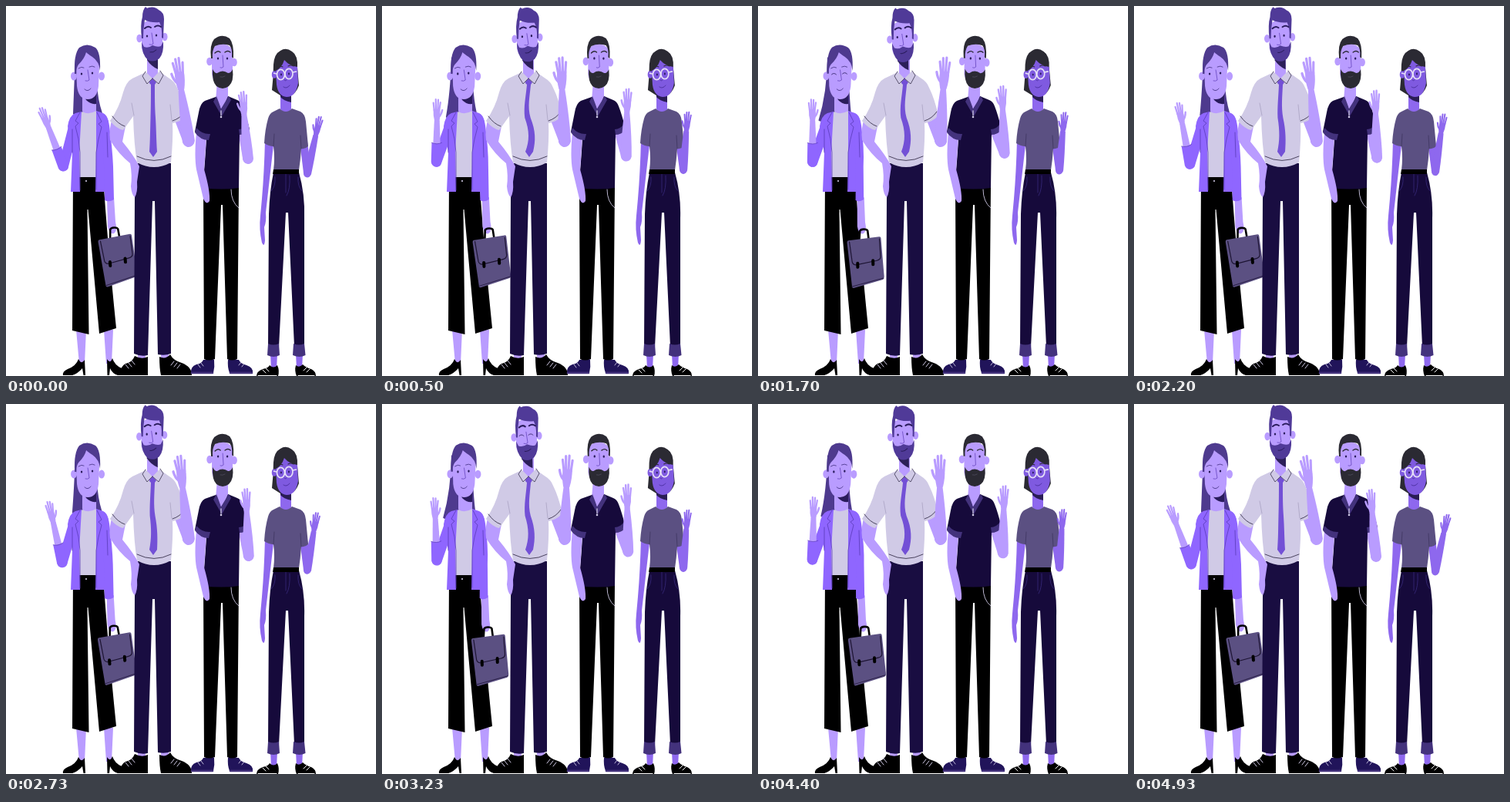
Recreate the animation shown at these times as an HTML page. Size 480 by 480 pixels, loop 5.01 s.

```html
<!DOCTYPE html>
<html lang="en">
<head>
<meta charset="utf-8">
<title>Four people waving</title>
<style>
  html, body { margin: 0; width: 100%; height: 100%; overflow: hidden; background: #fff; }
  svg { display: block; width: 100vw; height: 100vh; }
</style>
</head>
<body>
<svg id="stage" viewBox="0 0 480 480"></svg>
<script>
const C = {
  skin: '#b99cff', deep: '#8e68ee', face4: '#7f5ae0', plum: '#4e3a8e', violet: '#8f66ff',
  cloth: '#d0cae6', navy: '#190d41', indigo: '#160a3b', band: '#43327c', slate: '#5b5082',
  coal: '#2b2a33', black: '#000', ink: '#2a1c5c', tie: '#7350d6', white: '#fff'
};

// markup helpers
const fill = (color, d, id = '') => `<path id="${id}" fill="${color}" d="${d}"/>`;
const line = (color, d, w = 1) =>
  `<path fill="none" stroke="${color}" stroke-width="${w}" stroke-linecap="round" stroke-linejoin="round" d="${d}"/>`;
const oval = (color, x, y, rx, ry = rx) =>
  `<ellipse fill="${color}" cx="${x}" cy="${y}" rx="${rx}" ry="${ry}"/>`;
const group = (id, ...parts) => `<g id="${id}">${parts.join('')}</g>`;
const upperArm = (i, color, x, y, w) =>
  `<line id="upper${i}" x1="${x}" y1="${y}" stroke="${color}" stroke-width="${w}" stroke-linecap="round"/>`;

const hand = (color, y, k, side) => `<g transform="translate(0 ${-y}) scale(${k * side} ${k})">` +
  fill(color, 'M-3 2 Q-5.4 -7 -5 -15 H3.8 Q5 -8 3 2Z') +
  line(color, 'M-3.8 -13 L-5 -23.5 M-1.5 -14 L-1.9 -28 M.9 -14 L1.4 -27.5 M2.8 -13 L4.4 -24', 2.3) +
  line(color, 'M3 -5 Q6 -8 7 -14', 2.4) + '</g>';

const forearm = (i, color, w, len, k, side, extra = '') => group('arm' + i,
  fill(color, `M${-w} 0 Q${-w} -${len * .4} -3.4 -${len} H3.4 Q${w} -${len * .4} ${w} 0 Q${w * .8} 6 0 6 Q${-w * .8} 6 ${-w} 0Z`),
  hand(color, len, k, side), extra);

const eyes = (i, pts) =>
  group(`eyes${i}Open`, ...pts.map(([x, y]) => oval(C.ink, x, y, 1.2, 1.6))) +
  group(`eyes${i}Shut`, ...pts.map(([x, y]) => line(C.ink, `M${x - 3} ${y + 1} q3 -3 6 0`, .8)));

const woman1 = () =>
  fill(C.plum, '', 'hair1') +
  fill(C.skin, 'M91 420 H104 L102 464 H95Z M127 420 H139 L137 464 H130Z') +
  fill(C.black, 'M94 458 Q98 466 102 459 L103 479 H100.5 L99 470 Q93 477 86 479 H74 Q73 474 80 471 Q91 467 94 458Z') +
  fill(C.black, 'M131 458 Q135 465 138 457 Q141 466 150 470 Q156 474 156 479 H145 Q138 477 135 470 L134 479 H131.5Z') +
  fill(C.black, 'M87 220 H126 Q131 300 143 418 L121 425 L106.5 264 H105.5 L107.5 426 L86 421Z') +
  oval(C.cloth, 104, 227, 1.1) +
  group('bagArm',
    fill(C.skin, 'M131 248 H140 L142 280 Q145 292 140 295 Q134 297 132 286Z')) +
  group('bag',
    line(C.black, 'M-6 13 L-5 2 Q-4 0 0 0 Q4 0 5 2 L6 12', 2.6),
    fill(C.slate, 'M-20 14 L20 10 Q22 10 22 12 L25 62 Q25 65 23 66 L-15 76 Q-17 76 -17 74 L-22 17 Q-22 14 -20 14Z'),
    line('#1d1433', 'M-19 16 L-16 42 Q-15 46 -11 46 L16 41 Q21 40 21 36 L20 13', 1.2),
    line(C.black, 'M-9 44 v5 M11 41 v5', 4),
    line('#2b2148', 'M-17 74 L24 64', 1)) +
  fill(C.skin, 'M99 108 H117 V136 Q112 142 106 142 Q101 142 99 136Z') +
  fill(C.cloth, 'M95 141 L99 137 Q107 142 117 136 L119 141 V222 H95Z') +
  upperArm(1, C.violet, 88, 155, 13) +
  fill(C.violet, 'M98 137 L90 139 Q82 142 80 156 L86 190 L84 241 H96 L95 190Z') +
  fill(C.violet, 'M117 136 L126 139 Q131 141 133 150 L128 241 H116 L117 190Z') +
  fill(C.violet, '', 'sleeve1') +
  line('#5a3bb8', 'M96 138 L90 149 L94 152 L90 156 Q95 172 96 190 L96 239 M118 138 L124 150 L120 153 L124 157 Q119 174 117 190 V238 M86 160 L86 190 M131 164 L132 196', .8) +
  group('head1',
    oval(C.skin, 88, 91, 4, 5.5) + oval(C.skin, 124, 91, 4, 5.5),
    fill(C.ink, 'M99 114 H117 L117 127 Q110 128 104 122Z'),
    fill(C.skin, 'M91 78 Q92 58 105 58 Q120 58 121 78 L120 104 Q118 121 106 121 Q94 121 92 104Z'),
    fill(C.plum, 'M89 88 Q88 62 95 54 Q105 47 116 54 Q123 60 122 84 Q121 72 112 66 Q106 62 104 60 Q102 68 94 76 Q91 80 91 88Z'),
    eyes(1, [[98, 88], [112, 87]]),
    line(C.plum, 'M94 81 q4 -3 7 -1 M108 79 q4 -2 7 0', .9),
    line('#6f4fc4', 'M106 83 L108 96 Q106 98 103 97', .9),
    line(C.plum, 'M102 108 Q106 112 110 107', .9)) +
  forearm(1, C.skin, 5, 54, .97, 1,
    fill(C.violet, 'M-7 0 L-6.5 -25 Q0 -22 6.5 -25 L6.5 0 Q6 6 0 6 Q-6 6 -7 0Z') +
    line('#5a3bb8', 'M-6.5 -25 Q0 -22 6.5 -25', .7));

const man2 = () =>
  fill(C.skin, 'M171 448 H181 V460 H171Z M201 448 H211 V460 H201Z') +
  fill(C.black, 'M167 454 Q176 459 184 455 V479 H149 Q147 468 155 464 Q164 462 167 454Z') +
  fill(C.black, 'M199 455 Q207 459 213 452 Q217 460 228 463 Q241 468 241 479 H201 Q199 470 199 455Z') +
  line(C.cloth, 'M155 465 l4 5 M159 463 l4 5 M163 460 l4 5 M218 461 l-4 5 M222 463 l-4 5 M226 465 l-4 5', 1) +
  fill(C.navy, 'M169 204 H214 V451 Q206 454 197 452 L193 253 H190 L184 453 Q175 455 166 451 L167 250Z') +
  fill(C.skin, 'M138 146 Q133 160 135 174 Q146 192 161 204 Q164 220 162 234 Q163 245 167 248 Q171 242 170 228 L173 208 Q166 194 151 176 L155 156Z') +
  upperArm(2, C.skin, 224, 142, 14) +
  fill(C.skin, 'M183 62 H197 V88 L190 97 L183 88Z') +
  fill(C.cloth, 'M181 86 L164 94 Q156 98 152 112 Q147 132 135 149 Q143 159 152 161 L165 143 Q166 180 170 203 Q192 215 214 203 Q217 172 216 152 Q227 150 234 142 Q229 120 222 106 Q219 98 212 94 L199 85 L190 95Z') +
  line('#3b3550', 'M138 143 Q145 153 154 156 M216 149 Q226 146 232 137 M170 195 Q192 206 214 195', .9) +
  line('#a49dbd', 'M166 142 L163 126 M215 148 L213 128', .7) +
  fill(C.tie, '', 'tie') +
  fill(C.tie, 'M186 93 H194 L195 99 L191 105 L186 100Z') +
  fill(C.cloth, 'M181 85 L190 94 L183 102 L177 91Z M200 84 L190 94 L198 102 L204 90Z') +
  line('#3b3550', 'M181 85 L177 91 L183 101 L190 94 L198 101 L204 90 L200 84', .8) +
  group('head2',
    oval(C.skin, 173, 42, 3.6, 5.2) + oval(C.skin, 206, 40, 3.6, 5.2),
    fill('#2c1f59', 'M183 64 H197 V82 Q188 78 183 70Z'),
    fill(C.skin, 'M176 24 Q189 12 203 22 L203 54 Q201 67 190 67 Q178 67 176 54Z'),
    fill('#503a98', 'M176 42 Q174 24 177 14 Q177 5 181 1 Q183 4 185 2 Q193 0 198 5 Q205 8 205 17 L204 42 L202 41 Q203 29 199 21 Q188 22 180 18 Q178 29 178 42Z'),
    fill('#503a98', 'M176 47 L179 53 Q185 55 190 51 Q197 54 201 52 L204 46 Q205 61 199 68 Q192 74 184 70 Q176 63 176 47Z'),
    line(C.ink, 'M187 60 Q191 61 195 57', 1),
    line(C.ink, 'M180 29 Q184 25 188 28 M193 27 Q197 24 201 27', 2),
    eyes(2, [[183, 39], [195, 38]]),
    line('#6f4fc4', 'M189 35 L191 49 Q189 51 186 50', .9)) +
  forearm(2, C.skin, 8, 71, 1.36, -1);

const man3 = () =>
  fill(C.skin, 'M259 452 H270 V464 H259Z M288 452 H299 V464 H288Z') +
  fill('#21145a', 'M256 459 H270 Q271 468 269 476 H240 Q239 468 247 465 Q254 464 256 459Z M288 459 H302 Q304 464 312 466 Q321 469 320 476 H290 Q287 468 288 459Z') +
  line(C.band, 'M241 476 H268 M291 476 H319', 2.6) +
  line(C.cloth, 'M249 465 l3 4 M253 463 l3 4 M309 464 l-3 4 M305 462 l-3 4', .9) +
  fill(C.black, 'M256 234 H302 L300 458 Q293 461 287 458 L281 258 H279 L271 458 Q263 461 257 458Z') +
  line(C.cloth, 'M292 238 Q292 254 302 262', .9) +
  upperArm(3, C.skin, 307, 160, 13) +
  fill(C.skin, 'M274 98 H288 V120 L280 136 L272 122Z') +
  fill(C.indigo, 'M272 118 L258 123 Q252 126 250 138 L245 163 Q252 172 260 172 Q258 206 255 236 Q280 239 302 236 L303 166 Q311 166 316 160 Q311 140 307 130 Q305 124 300 122 L288 117 L279 138Z') +
  fill(C.skin, 'M247 164 Q244 195 247 212 L256 250 Q260 259 264 253 Q265 240 257 212 L260 170Z') +
  fill(C.band, 'M247 158 Q255 167 265 166 L263 174 Q252 174 245 164Z M302 160 Q309 160 314 153 L316 161 Q310 167 303 167Z') +
  fill(C.band, 'M273 117 L279 133 L289 117 L292 122 L280 143 L269 124Z') +
  fill(C.skin, 'M274 114 H288 L279 133Z') +
  line(C.cloth, 'M279 136 V142', 1.3) + oval(C.cloth, 279, 144, 1.3) +
  group('head3',
    oval(C.skin, 264, 72, 3.8, 5.3) + oval(C.skin, 296, 73, 3.8, 5.3),
    fill(C.skin, 'M267 56 Q280 42 294 56 L294 88 Q291 104 281 104 Q270 104 267 88Z'),
    fill(C.coal, 'M266 68 Q264 50 270 43 Q280 35 290 42 Q296 49 295 68 L293 66 Q294 56 290 51 Q280 48 271 52 Q267 58 268 68Z'),
    fill(C.coal, 'M268 82 Q271 88 274 87 Q281 82 288 87 Q292 87 294 82 Q296 98 289 104 Q281 110 273 104 Q267 98 268 82Z'),
    line('#4a4758', 'M278 92 Q281 93 284 91', .9),
    line(C.coal, 'M271 61 Q275 57 278 60 M284 60 Q288 57 291 60', 1.4),
    eyes(3, [[275, 68], [287, 68]]),
    line('#6f4fc4', 'M281 64 L282 79 Q280 81 278 80', .9)) +
  forearm(3, C.skin, 7, 58, 1.05, -1);

const woman4 = () =>
  fill(C.deep, 'M343 450 H352 L351 472 H344Z M376 450 H385 L384 472 H377Z') +
  fill(C.black, 'M342 466 Q347 471 352 466 Q355 473 353 480 H325 Q325 474 333 471 Q340 470 342 466Z M376 466 Q380 470 385 465 Q389 469 396 471 Q402 474 402 480 H377 Q374 473 376 466Z') +
  line(C.white, 'M333 472 l4 4 M337 470 l4 4 M390 469 l-4 4 M394 471 l-4 4 M327 479.5 H351 M379 479.5 H400', 1) +
  fill(C.deep, 'M336 174 Q335 215 332 250 L330 272 Q328 290 332 307 Q335 314 336 304 L335 287 Q338 280 337 268 L343 215 L347 180Z') +
  upperArm(4, C.deep, 386, 176, 10) +
  fill(C.indigo, 'M347 216 H380 Q388 244 387 275 L387 442 H374 L366 268 H363 L354 442 H340 L341 270 Q342 240 347 216Z') +
  line('#3d2e86', 'M363 218 V242 M368 220 Q369 238 364 246 M349 222 Q350 234 344 240 M379 222 Q378 234 384 240', .7) +
  fill(C.band, 'M340 438 Q347 441 354 438 L355 453 Q347 457 339 453Z M373 438 Q380 441 387 438 L388.5 453 Q381 457 372 453Z') +
  fill(C.deep, 'M356 112 H370 V134 Q363 142 356 134Z') +
  fill(C.slate, 'M355 133 Q363 141 371 133 L382 137 Q388 140 389 150 L392 182 Q388 186 383 185 Q382 200 380 213 H347 Q349 198 347 182 Q341 182 335 178 Q336 160 340 146 Q342 139 347 137Z') +
  line('#3e3560', 'M347 182 L348 166 M383 185 L382 168', .8) +
  fill(C.black, 'M347 212 H380 V218 H346Z') +
  group('head4',
    fill(C.coal, 'M345 109 Q347 92 347 76 Q348 62 356 58 Q363 53 371 59 Q379 64 378 80 L380 103 Q376 114 369 116 H356Z'),
    fill('#2a1d55', 'M356 112 H370 V125 Q360 123 356 118Z'),
    oval(C.face4, 348, 89, 3.2, 4.8),
    fill(C.face4, 'M350 84 Q358 80 361 70 Q368 78 378 79 L379 100 Q376 118 364 118 Q353 117 351 102Z'),
    line(C.coal, 'M352 80 q4 -3 7 -1 M366 78 q4 -2 7 0', 1.1),
    oval(C.ink, 357, 89, 1, 1.4) + oval(C.ink, 367, 88, 1, 1.4),
    `<g fill="none" stroke="#e6e0f7" stroke-width="1.7"><ellipse cx="356.5" cy="89" rx="5" ry="6.6"/><ellipse cx="367" cy="88" rx="5" ry="6.6"/><path d="M361 87 h2 M372 86 l5 -1 M351 88 l-4 -1"/></g>`,
    line('#4b2fa0', 'M361 96 q2 2 3 0 M360 105 Q364 108 368 103', .9)) +
  forearm(4, C.deep, 5.2, 50, .88, -1);

document.getElementById('stage').innerHTML = woman1() + man2() + man3() + woman4();

const $ = id => document.getElementById(id);
const set = (id, name, value) => $(id).setAttribute(name, value);
const place = (id, x, y, a) => set(id, 'transform', `translate(${x} ${y}) rotate(${a})`);
const turn = (id, a, x, y) => set(id, 'transform', `rotate(${a} ${x} ${y})`);
const wave = (n, period) => Math.cos(2 * Math.PI * n / period);

function pose(i, x, y, a) {
  place('arm' + i, x, y, a);
  set('upper' + i, 'x2', x);
  set('upper' + i, 'y2', y);
}

function blink(i, shut) {
  set(`eyes${i}Open`, 'visibility', shut ? 'hidden' : 'visible');
  set(`eyes${i}Shut`, 'visibility', shut ? 'visible' : 'hidden');
}

function draw(n) {
  const slow = wave(n, 50), fast = wave(n, 25);
  const late = wave(n + .75 * (1 - slow), 25);
  const lag = 1 - slow;

  pose(1, 72.5 + 2 * late, 205 + 3 * late, -9.5 - 11.5 * late);
  pose(2, 237, 176, -.5 - 7.7 * slow);
  const ex = 318 - 4 * slow;
  pose(3, ex, 193.5 + 5 * slow, (313.5 - 5.5 * fast - ex) * .85);
  pose(4, 391, 214 + 2.5 * fast, 8 + 4.5 * fast);

  const s = 6 * lag;
  set('hair1', 'd', `M90 66 Q${88 + s * .2} 112 ${87 - s} ${140 + s} Q${93 - s} ${148 + s * .6} 99 140 L${125 - s * .5} 139 Q119 122 118 100Z`);
  turn('head1', .5 * lag, 107, 130);
  set('head2', 'transform', `translate(${-1.2 * lag} ${lag}) rotate(${-.5 * lag} 190 80)`);
  turn('head3', .8 * lag, 280, 110);
  turn('head4', -.3 * lag, 363, 125);

  const d = 2 * lag;
  set('sleeve1', 'd', `M124 140 Q132 141 134 155 Q138 185 ${139 - d * .8} 208 L${140 - d} 251 Q${134 - d} 255 ${128 - d * .5} 252 L127 205Z`);
  turn('bagArm', .9 * lag, 130, 145);
  place('bag', 138 + 2 * slow, 289 - 1.5 * slow, -2.5 - 2.5 * slow);

  const w = 2.4 * (1 - late);
  set('tie', 'd', `M188 102 C${188 - w * .3} 118 ${188 - w} 130 ${187.5 - w * .5} 145 C${187 + w} 162 ${187 + w} 175 186 189 L191 196 L196 189 ` +
    `C${195 + w} 175 ${195 + w} 162 ${194 - w * .3} 145 C${193 - w} 130 ${193 - w * .3} 118 193 102Z`);

  blink(1, Math.abs(n - 34) < 3);
  blink(2, Math.abs(n - 65) < 3);
  blink(3, Math.abs(n - 78) < 3);
}

// steps fall at 0 and 30 ms of every 100 ms
const start = performance.now();
function tick() {
  const t = (performance.now() - start) % 5010;
  draw(Math.min(99, 2 * Math.floor(t / 100) + (t % 100 >= 30 ? 1 : 0)));
  requestAnimationFrame(tick);
}
tick();
</script>
</body>
</html>
```
